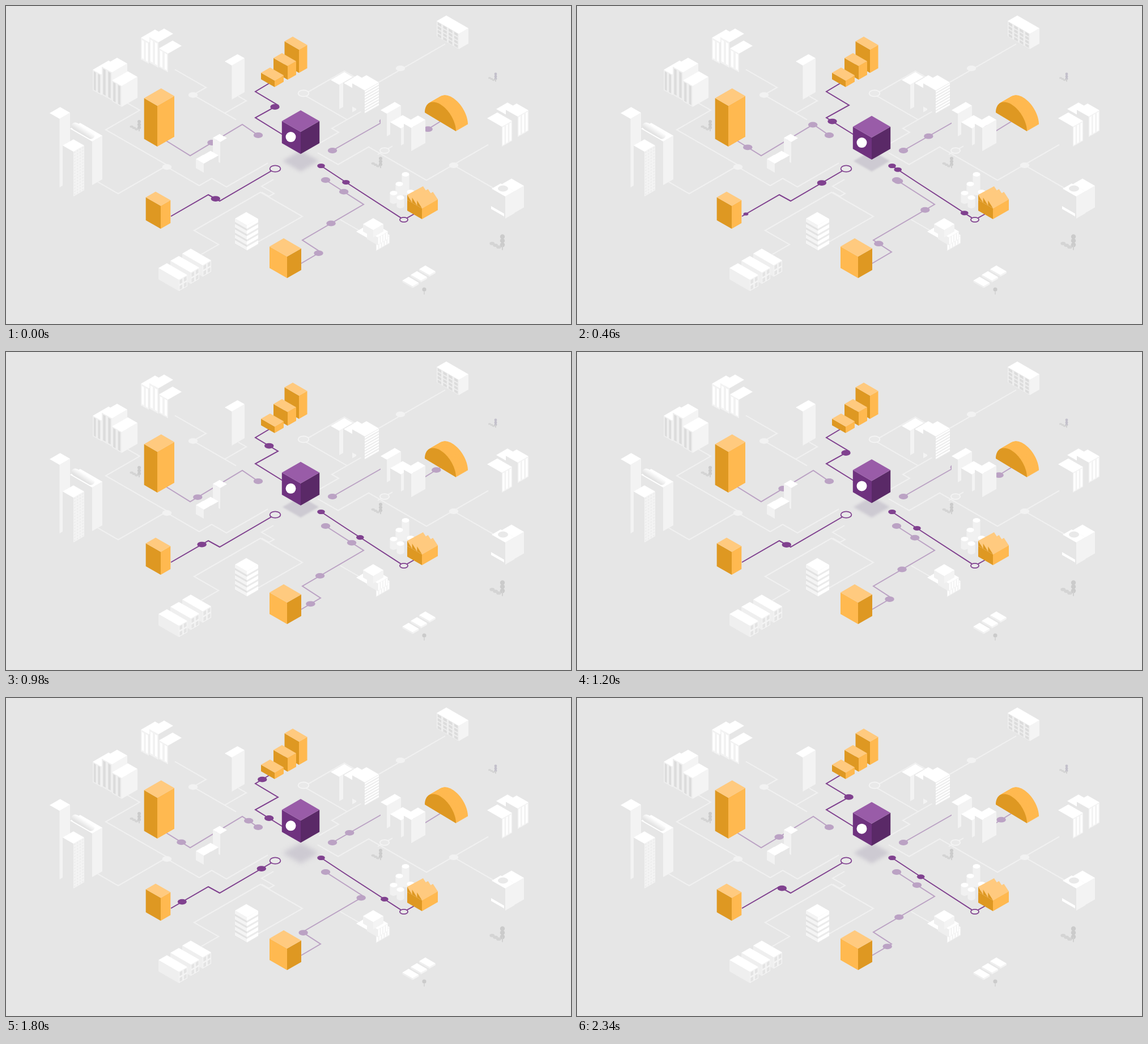
Recreate the animation shown at these times as an HTML page with a canvas. Size 997 px wide and 561 px high, loop 2360 ms.

```html
<!DOCTYPE html>
<html lang="en">
<head>
<meta charset="utf-8">
<title>Connected city</title>
<style>
html, body { margin: 0; width: 100%; height: 100%; overflow: hidden; background: #e6e6e6; }
canvas { display: block; }
</style>
</head>
<body>
<canvas id="stage" width="997" height="561"></canvas>
<script>
const ctx = document.getElementById('stage').getContext('2d');
const LOOP = 2360, BEAT = 1200, SLOPE = 0.575;
const BG = '#e6e6e6', PALE = '#f2f2f2', PURPLE = '#80418f', LILAC = '#bba2c4';
const SOLID = ['#fff', '#efefef', '#f4f4f4'];
const EAST_LIT = ['#fff', BG, '#f3f3f3'];
const WEST_LIT = ['#fff', '#f2f2f2', BG];
const ORANGE = ['#ffca7f', '#de9822', '#ffb950'];
const VIOLET = ['#995ca8', '#6f327f', '#5a2967'];

function trace(points) {
  ctx.beginPath();
  for (const [x, y] of points) ctx.lineTo(x, y);
}

function poly(color, ...points) {
  trace(points);
  ctx.fillStyle = color;
  ctx.fill();
}

function line(color, points) {
  trace(points);
  ctx.strokeStyle = color;
  ctx.lineWidth = 2;
  ctx.stroke();
}

function oval(color, x, y, scale = 1, rx = 8.2, ry = 4.9) {
  ctx.fillStyle = color;
  ctx.beginPath();
  ctx.ellipse(x, y, rx * scale, ry * scale, 0, 0, 7);
  ctx.fill();
}

function ring(color, x, y, scale) {
  oval('#e9e9e9', x, y, scale);
  ctx.strokeStyle = color;
  ctx.lineWidth = 1.8;
  ctx.stroke();
}

// Vertical wall from its top left corner; dir 1 falls to the right, -1 rises.
function wall(color, x, y, w, h, dir) {
  const d = w * SLOPE * dir;
  poly(color, [x, y], [x + w, y + d], [x + w, y + d + h], [x, y + h]);
}

function panes(x, y, w, h, dir, { color = '#fff', cols = 1, rows = 1, fx = 0.5, fy = 0.85 }) {
  const pw = w / cols, ph = h / rows;
  for (let i = 0; i < cols; i++) for (let j = 0; j < rows; j++) {
    const dx = pw * (i + (1 - fx) / 2);
    wall(color, x + dx, y + dx * SLOPE * dir + ph * (j + (1 - fy) / 2), pw * fx, ph * fy, dir);
  }
}

// Isometric block: (x, y) is the front roof corner, a and b run left and right.
function block(x, y, a, b, h, [top, left, right], west, east) {
  const l = y - a * SLOPE, r = y - b * SLOPE;
  wall(left, x - a, l, a, h, 1);
  wall(right, x, y, b, h, -1);
  poly(top, [x, y], [x - a, l], [x - a + b, l - b * SLOPE], [x + b, r]);
  if (west) panes(x - a, l, a, h, 1, west);
  if (east) panes(x, y, b, h, -1, east);
}

function silo(x, y, h) {
  ctx.fillStyle = '#f1f1f1';
  ctx.fillRect(x - 6.5, y, 13, h);
  oval('#f1f1f1', x, y + h, 0.8);
  oval('#fff', x, y, 0.8);
}

function tree(x, y, s, color = '#cbcbcb') {
  for (let i = 0; i < 3; i++) {
    oval('#d4d4d4', x - (5 + i * 4.5) * s, y + (14 - i * 2.4) * s, s, 3.4, 2.2);
    oval(color, x, y + i * 5.5 * s, s, 3.2, 3.2);
  }
  line('#d0d0d0', [[x, y + 11 * s], [x, y + 18 * s]]);
}

// A street follows the grid: each run is horizontal, and the axis flips at every corner.
function street(x, y, axis, ...runs) {
  const points = [[x, y]];
  for (const run of runs) {
    x += run;
    y += run * axis * SLOPE;
    axis = -axis;
    points.push([x, y]);
  }
  line('#f1f1f1', points);
}

function streets() {
  street(298, 112, 1, 55, -23, 76);
  street(386, 189, -1, 38, -14);
  street(212, 170, 1, 24, -60, 109, -87, -36);
  street(284, 284, 1, 57, 22, 26, 73);
  street(601, 200, 1, -76, 72, 23);
  street(775, 67, -1, -117);
  street(627, 186, -1, -52, 12, -35);
  street(550, 259, 1, 36, 54, 102, 109);
  street(790, 281, 1, 75);
  street(656, 262, -1, 26);
  street(345, 438, -1, 30, -43, 117, 74, -79);
  street(472, 306, -1, -21, 22, -9, -13);
  street(590, 377, 1, 40);
  oval(PALE, 330, 157);
  oval(PALE, 284, 284);
  oval(PALE, 696, 110);
  oval(PALE, 790, 281);
  ring('#f4f4f4', 525, 154, 1.15);
  ring('#f4f4f4', 668, 255, 1);
}

// Corners of each route with the time at which a pulse reaches them.
const routes = [
  { color: PURPLE, path: [[465, 136, 468], [440, 151, 729], [480, 175, 1145], [440, 197, 1553], [490, 228, 2066]] },
  { color: LILAC, grows: true, dot: true, path: [[283, 238, 150], [325, 264, 865], [417, 209, 1668], [445, 228, 2000]] },
  { color: PURPLE, grows: true, path: [[291, 371, 385], [357, 333, 1105], [377, 344, 1255], [475, 287, 1980]] },
  { color: PURPLE, dot: true, size: 0.83, path: [[720, 367, 130], [702, 377, 300], [600, 311, 1200], [556, 282, 1800]] },
  { color: LILAC, dot: true, path: [[521, 454, 725], [555, 434, 1255], [523, 413, 1830], [631, 350, 3050], [564, 307, 4110]] },
  { color: LILAC, dot: true, path: [[766, 204, 880], [740, 220, 1270], [676, 198, 2310], [576, 255, 3300]] }
];

function pulses({ color, size = 1, grows, path }, t) {
  const start = path[0][2];
  for (let u = t % BEAT; u < path.at(-1)[2]; u += BEAT) {
    if (u < start) continue;
    const i = path.findIndex(p => p[2] > u);
    const [x0, y0, t0] = path[i - 1], [x1, y1, t1] = path[i];
    const f = (u - t0) / (t1 - t0);
    const scale = grows ? Math.min(1, 0.3 + (u - start) / 320) : 1;
    oval(color, x0 + (x1 - x0) * f, y0 + (y1 - y0) * f, size * scale);
  }
}

function network(t) {
  for (const { color, path, dot, size } of routes) {
    line(color, path);
    if (dot) oval(color, ...path.at(-1).slice(0, 2), size);
  }
  ring(PURPLE, 702, 377, 0.86);
  for (const route of routes) pulses(route, t);
  ring(PURPLE, 475, 287, 1.15);
}

function northWest() {
  const bright = { cols: 2 }, dim = { cols: 2, color: '#dcdcdc', fy: 0.9 };
  block(252, 64, 14, 25, 38, WEST_LIT, bright);
  block(269, 64, 16, 26, 45, WEST_LIT, bright);
  block(286, 84, 16, 24, 33, WEST_LIT, bright);
  block(168, 121, 15, 28, 36, SOLID, dim);
  block(187, 117, 18, 27, 50, SOLID, dim);
  block(204, 141, 17, 28, 37, SOLID, dim);
  block(398.5, 105, 12.5, 22.5, 60, EAST_LIT);
}

function west() {
  block(94.5, 199, 17.5, 18.5, 121, EAST_LIT);
  block(152, 239, 39, 18, 77, EAST_LIT);
  const shine = ctx.createLinearGradient(130, 222, 140, 207);
  shine.addColorStop(0, '#e3e3e3');
  shine.addColorStop(0.6, '#fff');
  shine.addColorStop(1, '#f0f0f0');
  ctx.lineCap = 'round';
  ctx.strokeStyle = shine;
  ctx.lineWidth = 13;
  trace([[122, 212], [150, 228]]);
  ctx.stroke();
  ctx.lineCap = 'butt';
  block(119, 257, 19, 19, 79, EAST_LIT, null, { color: '#ebebeb', cols: 4, rows: 15, fx: 0.45, fy: 0.4 });
  block(378, 240, 13, 12, 37, WEST_LIT);
  block(362, 271, 14, 13, 16, WEST_LIT);
  block(349, 278, 14, 13, 16, WEST_LIT);
}

function northEast() {
  for (const x of [588, 611]) {
    const y = 139 + (x - 588) * 0.24;
    block(x, y, 15, 24, 0, SOLID);
    wall('#f3f3f3', x, y, 7, 43, -1);
  }
  block(633, 149, 22, 25, 41, ['#fff', BG, '#ececec'], null, { rows: 8, fx: 1, fy: 0.55 });
  block(799, 49, 39, 17, 27, SOLID, { color: '#dcdcdc', cols: 4, rows: 4, fx: 0.65, fy: 0.7 });
  block(672, 190, 11, 25, 40, EAST_LIT);
  block(697, 216, 19, 22, 30, EAST_LIT);
  block(715, 215, 13, 25, 41, EAST_LIT);
  const striped = { cols: 3, fy: 0.9 };
  block(883, 192, 18, 20, 40, EAST_LIT);
  block(903, 195, 21, 19, 36, EAST_LIT, null, striped);
  block(875, 213, 26, 18, 35, EAST_LIT, null, striped);
}

function southEast() {
  silo(705, 297, 33);
  silo(694, 314, 22);
  silo(714, 328, 18);
  silo(684, 330, 15);
  silo(696, 338, 15);
  block(897, 327, 22, 17, 38, EAST_LIT);
  block(881, 336, 24, 16, 39, EAST_LIT);
  oval('#e9e9e9', 877, 322, 1.1);
  wall('#fff', 856, 353, 23, 5, 1);
  block(653, 418, 35, 24, 14, EAST_LIT, null, { cols: 5 });
  block(656, 408, 19, 18, 14, SOLID, null, { cols: 4 });
  block(648, 395, 18, 18, 13, SOLID);
  for (let i = 0; i < 3; i++) block(747 - i * 14.8, 474.5 + i * 10, 18, 11, 3, SOLID);
}

function southWest() {
  block(425, 387, 21, 20, 45, ['#fff', '#e2e2e2', '#ebebeb']);
  for (let i = 0; i < 5; i++) {
    const y = 387 + i * 9.5;
    wall('#f4f4f4', 404, y - 12, 21, 6, 1);
    wall('#fff', 425, y, 20, 6, -1);
  }
  for (let i = 2; i >= 0; i--) {
    block(305 + i * 21, 483 - i * 12.8, 36, 15, 20, SOLID, null,
      { color: '#e4e4e4', cols: 2, rows: 2, fx: 0.65, fy: 0.7 });
  }
}

function dome() {
  const arch = (color, shift) => {
    const points = [];
    for (let a = 0; a <= Math.PI + 0.01; a += Math.PI / 40) {
      const c = Math.cos(a);
      points.push([766.5 + shift + 27.5 * c, 204.5 - shift * SLOPE + 16.5 * c - 31 * Math.sin(a)]);
    }
    poly(color, ...points);
  };
  for (let i = 21; i > 0; i -= 0.5) arch(ORANGE[2], i);
  arch(ORANGE[1], 0);
}

function factory() {
  const [top, left, right] = ORANGE;
  block(734, 357, 26, 28, 19, ORANGE);
  for (let i = 0; i < 3; i++) {
    const x = 708 + i * 8.7, y = 342 + i * 5;
    poly(top, [x, y - 9], [x + 28, y - 24], [x + 36.5, y - 11], [x + 8.7, y + 5]);
    poly(left, [x, y], [x, y - 9], [x + 8.7, y + 5]);
  }
}

function orangeBlocks() {
  const [top, dark, light] = ORANGE;
  block(267, 176, 23.3, 30, 72, ORANGE);
  block(273, 352.5, 26.3, 17.3, 40.5, ORANGE);
  block(496, 442, 31, 25, 38, [top, light, dark]);
  block(517, 77, 25.5, 14.5, 41, ORANGE);
  block(497, 106, 25, 15, 24, ORANGE);
  block(474, 131.5, 24, 16, 11.5, ORANGE);
  dome();
  factory();
}

function trees() {
  tree(235, 204, 0.95);
  tree(661, 269, 0.95);
  tree(864, 120, 0.75, '#c3c0cb');
  tree(876, 407, 1.3);
  oval('#cbcbcb', 738, 500, 1, 3.6, 3.6);
  line('#d6d6d6', [[738, 503], [738, 509]]);
}

function hub(t) {
  const bob = Math.sin(2 * Math.PI * (t - 125) / LOOP);
  const y = 225 + 9 * bob;
  ctx.filter = `blur(${2.7 - 1.5 * bob}px)`;
  poly('#cdcad2', [488, 273.5], [520, 255], [552, 273.5], [520, 292]);
  ctx.filter = 'none';
  block(520, y - 2.5 + 2.5, 33.2, 33.2, 39, VIOLET);
  oval('#fff', 502.5, y + 9, 1, 9, 9);
}

function draw(t) {
  ctx.fillStyle = BG;
  ctx.fillRect(0, 0, 997, 561);
  streets();
  network(t);
  trees();
  northWest();
  west();
  northEast();
  southEast();
  southWest();
  orangeBlocks();
  hub(t);
}

const begin = performance.now();
function tick() {
  draw((performance.now() - begin) % LOOP);
  requestAnimationFrame(tick);
}
tick();
</script>
</body>
</html>
```
